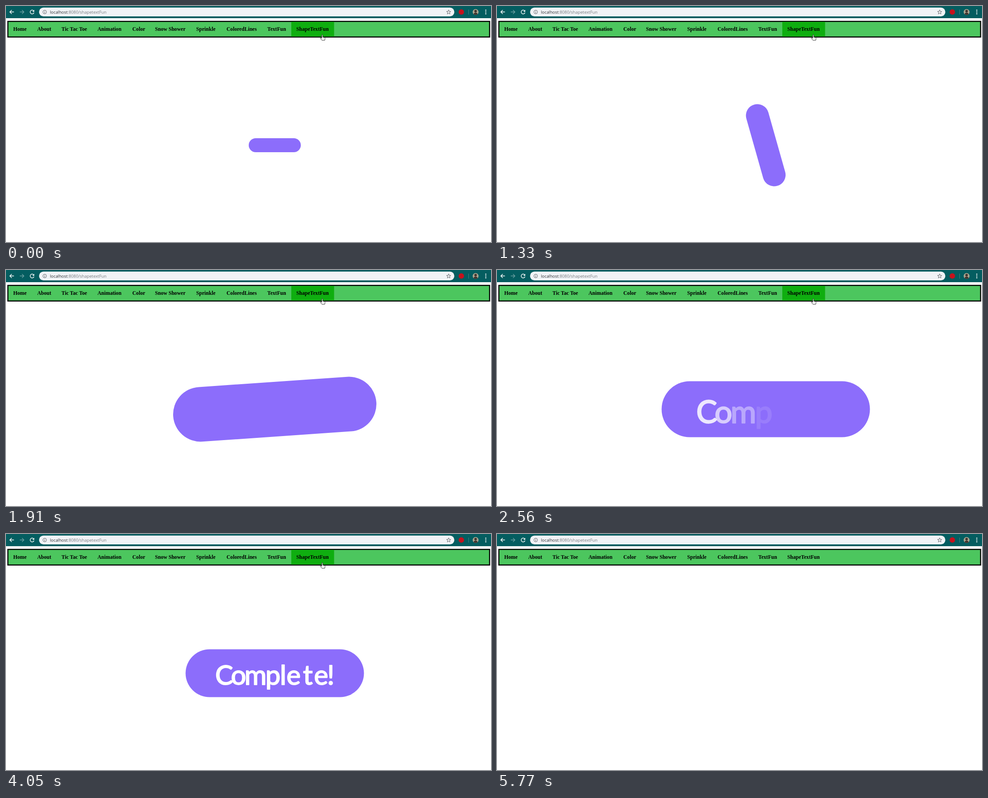
Write an HTML page that moves like this. It is 1071x523 px and loops after 6470 ms.

```html
<!DOCTYPE html>
<html lang="en">
<head>
<meta charset="utf-8">
<title>Shape and text</title>
<style>
  html, body { margin: 0; width: 100%; height: 100%; overflow: hidden; background: #fff; }
  svg { display: block; }
  #menu { font: bold 11.6px "Liberation Serif", serif; }
  #address { font: 9.3px "Open Sans", sans-serif; }
  #word { font: 69px Lato, sans-serif; text-anchor: middle; fill: #fff; stroke: #fff; stroke-width: 2.4; stroke-linejoin: round; }
  .line { fill: none; stroke: #fff; stroke-width: 1.4; }
</style>
</head>
<body>
<svg width="1071" height="523" viewBox="0 0 1071 523">
  <!-- browser bar -->
  <rect width="1071" height="27" fill="#045d60"/>
  <path class="line" d="M17.5 13.3H8.5M12.7 9L8.4 13.3L12.7 17.6"/>
  <path class="line" d="M30.5 13.3H39.5M35.3 9L39.6 13.3L35.3 17.6" opacity=".4"/>
  <path class="line" d="M61 10.6A4.3 4.3 0 1 0 61.8 14.5"/>
  <path d="M62.4 8.5V12.8H58.1Z" fill="#fff"/>
  <rect x="73" y="3.5" width="917" height="19.5" rx="9.75" fill="#f1f3f6"/>
  <g fill="none" stroke="#5f6368">
    <circle cx="85.5" cy="13.3" r="4"/>
    <path d="M85.5 12.7V15.8M85.5 10.8V11.8"/>
    <path id="star" stroke-linejoin="round"/>
  </g>
  <text id="address" x="97" y="16.8" fill="#2b2e33">localhost<tspan fill="#777b80">:8080/shapetextFun</tspan></text>
  <circle cx="1005.5" cy="13.3" r="6" fill="#c5121d"/>
  <path d="M1021.5 8V19" stroke="#3d8386"/>
  <clipPath id="round"><circle cx="1037" cy="13.3" r="6.5"/></clipPath>
  <g clip-path="url(#round)">
    <rect x="1030" y="6" width="14" height="15" fill="#a9a48f"/>
    <circle cx="1037" cy="11.3" r="2.8" fill="#40352f"/>
    <ellipse cx="1037" cy="19" rx="4.5" ry="4.6" fill="#40352f"/>
  </g>
  <g fill="#fff">
    <circle cx="1059.5" cy="9.3" r="1.2"/><circle cx="1059.5" cy="13.3" r="1.2"/><circle cx="1059.5" cy="17.3" r="1.2"/>
  </g>

  <!-- page menu -->
  <rect x="4.1" y="34.1" width="1063.8" height="34.6" fill="#4cc65e" stroke="#000" stroke-width="2.4"/>
  <rect id="hover" x="630" y="35.2" width="94.5" height="32.4" fill="#0fae10"/>
  <g id="menu"></g>

  <g id="pill">
    <rect x="-230" y="-62" width="460" height="124" rx="62" fill="#8c6dfb"/>
    <g id="word"></g>
  </g>

  <g stroke="#222" stroke-width=".9" stroke-linejoin="round" fill="#fff">
    <path id="hand" d="M-1.2 8V1C-1.2-.4 .9-.4 .9 1V5.2L5.2 6.2Q6.3 6.6 6.1 8L5.3 12.3H-.6L-4.2 8.3C-4.8 7.2-3.6 6.5-2.8 7.1Z"/>
    <path id="arrow" d="M.4.5V9.3L2.4 7.4L3.7 10.4L5.1 9.8L3.8 6.9H6.8Z"/>
  </g>
</svg>
<script>
const LOOP = 6470, CENTER = [593.5, 308.5];
const $ = id => document.getElementById(id);
const clamp = v => Math.min(1, Math.max(0, v));
const progress = (t, start, length) => clamp((t - start) / length);
const place = (id, x, y) => $(id).setAttribute('transform', `translate(${x} ${y})`);
const show = (id, on) => $(id).setAttribute('visibility', on ? 'visible' : 'hidden');

function addText(parent, text, x, y) {
  const el = document.createElementNS('http://www.w3.org/2000/svg', 'text');
  el.setAttribute('x', x);
  el.setAttribute('y', y);
  el.textContent = text;
  return $(parent).appendChild(el);
}

// CSS-style cubic timing curve
function bezier(x1, y1, x2, y2) {
  const curve = (a, b, u) => 3 * a * u * (1 - u) ** 2 + 3 * b * u * u * (1 - u) + u ** 3;
  return x => {
    let lo = 0, hi = 1;
    for (let i = 0; i < 24; i++) {
      const mid = (lo + hi) / 2;
      if (curve(x1, x2, mid) < x) lo = mid; else hi = mid;
    }
    return x <= 0 ? 0 : x >= 1 ? 1 : curve(y1, y2, lo);
  };
}
const ease = bezier(.25, .1, .25, 1);
const easeInOut = bezier(.42, 0, .58, 1);

// position along [time, x, y] stops
function along(stops, t) {
  let i = 0;
  while (i < stops.length - 2 && t > stops[i + 1][0]) i++;
  const [a, b] = [stops[i], stops[i + 1]];
  const p = progress(t, a[0], b[0] - a[0]);
  return [a[1] + (b[1] - a[1]) * p, a[2] + (b[2] - a[2]) * p];
}

const menu = { Home: 16, About: 69, 'Tic Tac Toe': 122.5, Animation: 202, Color: 279, 'Snow Shower': 329,
  Sprinkle: 420, ColoredLines: 487, TextFun: 577, ShapeTextFun: 641 };
for (const label in menu) addText('menu', label, menu[label], 55);

const letterX = [463, 500, 544, 589, 615, 642, 679, 713, 738];
const letters = [...'Complete!'].map((c, i) => addText('word', c, letterX[i] - CENTER[0], 30));

const starPoints = Array.from({ length: 10 }, (_, i) => {
  const r = i % 2 ? 2.1 : 5, a = i * Math.PI / 5;
  return `${977.5 + r * Math.sin(a)} ${13.6 - r * Math.cos(a)}`;
});
$('star').setAttribute('d', `M${starPoints.join('L')}Z`);

const LEAVE = 4560;
const exitPath = [[LEAVE, 697, 66], [4750, 771, 190], [4970, 888, 449]];
const edgePath = [[5510, 991, 515], [5770, 1010, 516]];

function draw(t) {
  const angle = 360 * easeInOut(progress(t, 126, 1930));
  const scale = 1 + 3 * easeInOut(progress(t, 1003, 1035)) - 3 * ease(progress(t, 3872, 1170));
  $('pill').setAttribute('transform', `translate(${CENTER}) rotate(${angle}) scale(${scale / 4})`);
  show('pill', t < 4885);

  letters.forEach((el, i) =>
    el.setAttribute('opacity', Math.sin(progress(t, 2305 + i * 76, 400) * Math.PI / 2)));

  const hovering = t < LEAVE;
  show('hover', hovering);
  show('hand', hovering);
  place('hand', 698.5, 63.7);
  show('arrow', !hovering && t < 5140 || t >= 5510 && t < 5770);
  place('arrow', ...along(t < 5140 ? exitPath : edgePath, t));
}

function tick() {
  draw(performance.now() % LOOP);
  requestAnimationFrame(tick);
}
tick();
</script>
</body>
</html>
```
